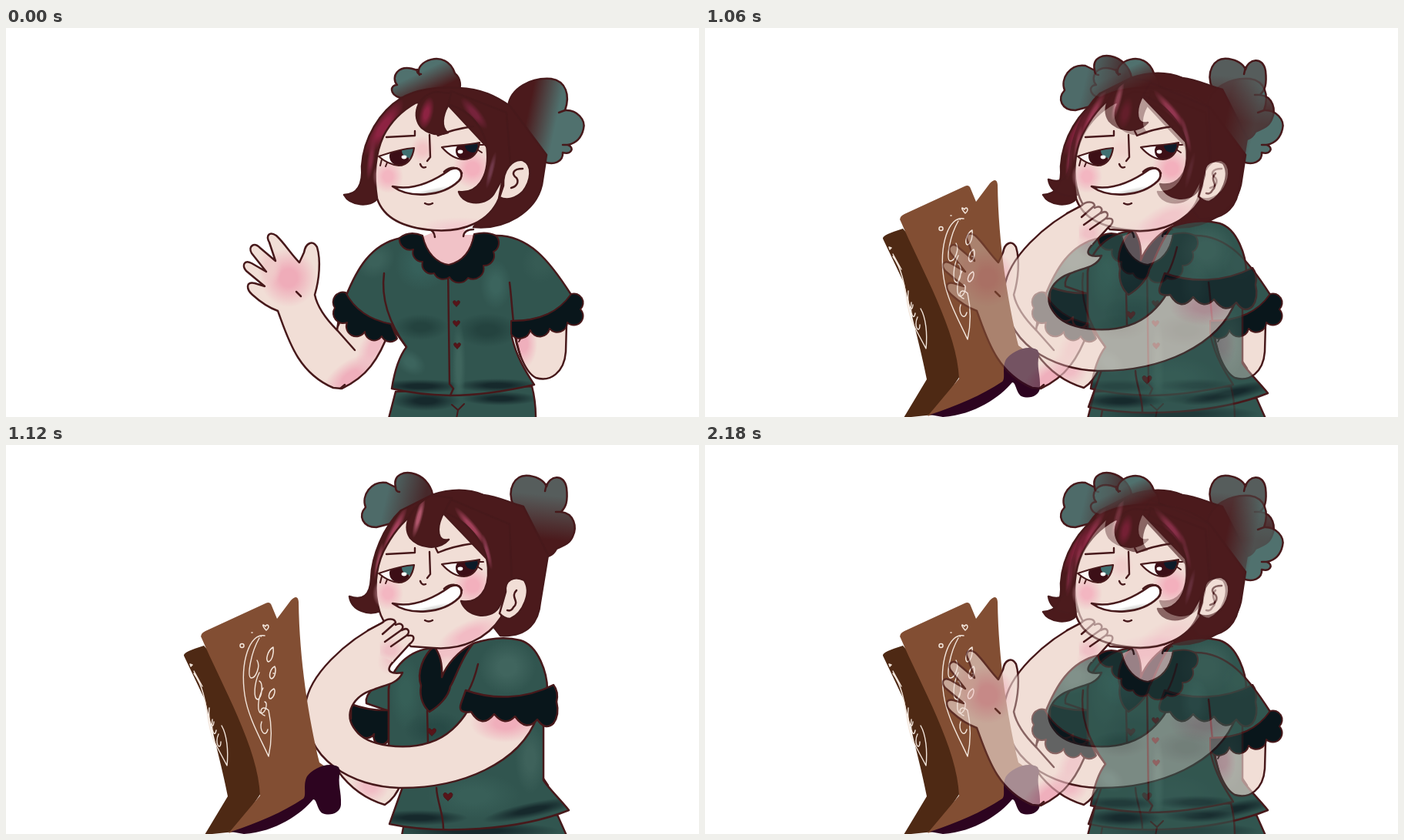
An HTML page with a canvas for the animation above (2240 ms loop, 900 by 506 pixels).

```html
<!DOCTYPE html>
<html lang="en">
<head>
<meta charset="utf-8">
<title>Wave and boots</title>
<style>
html, body { margin: 0; width: 100%; height: 100%; overflow: hidden; background: #fff; }
canvas { display: block; }
</style>
</head>
<body>
<canvas id="stage" width="900" height="506"></canvas>
<script>
const INK = '#47191b', HAIR = '#4b1a1c', CRIMSON = '#8d2342', TEAL = '#50716e';
const SKIN = '#f1ded6', PINK = '#efafbc', SHIRT = '#31554f', LIGHT = '#40655e';
const DEEP = '#16292c', LACE = '#09161b', BROWN = '#824e33', UMBER = '#4e2914', SOLE = '#2d0420';
const stage = document.getElementById('stage').getContext('2d');
let ctx;

function layer(paint) {
  const canvas = document.createElement('canvas');
  canvas.width = 900;
  canvas.height = 506;
  ctx = canvas.getContext('2d');
  ctx.lineCap = ctx.lineJoin = 'round';
  paint();
  return canvas;
}

function line(d, width = 2.5, color = INK) {
  ctx.lineWidth = width;
  ctx.strokeStyle = color;
  ctx.stroke(new Path2D(d));
}

function soft(x, y, rx, ry, color, angle = 0) {
  ctx.save();
  ctx.translate(x, y);
  ctx.rotate(angle * Math.PI / 180);
  ctx.scale(rx, ry);
  const glow = ctx.createRadialGradient(0, 0, 0, 0, 0, 1);
  glow.addColorStop(0.3, color);
  glow.addColorStop(1, color + '00');
  ctx.fillStyle = glow;
  ctx.fillRect(-1, -1, 2, 2);
  ctx.restore();
}

// Filled outline with soft shading kept inside it.
function shape(d, fill, shades = [], width = 2.5, color = INK) {
  const path = new Path2D(d);
  ctx.fillStyle = fill;
  ctx.fill(path);
  ctx.save();
  ctx.clip(path);
  shades.forEach(s => soft(...s));
  ctx.restore();
  if (width) line(d, width, color);
}

function blend(x0, y0, x1, y1, from, to) {
  const g = ctx.createLinearGradient(x0, y0, x1, y1);
  g.addColorStop(0, from);
  g.addColorStop(1, to);
  return g;
}

function heart(x, y, s) {
  shape(`M${x} ${y + s} C${x - 2 * s} ${y - s * .3} ${x - s * .8} ${y - s * 1.5} ${x} ${y - s * .4}
    C${x + s * .8} ${y - s * 1.5} ${x + 2 * s} ${y - s * .3} ${x} ${y + s}Z`, '#571419', [], 1);
}

function eye(d, irisX, irisY, tealX, glintX, glintY) {
  const path = new Path2D(d);
  const dot = (x, y, rx, ry, color) => {
    ctx.fillStyle = color;
    ctx.beginPath();
    ctx.ellipse(x, y, rx, ry, 0, 0, 7);
    ctx.fill();
  };
  ctx.fillStyle = '#fbf7f5';
  ctx.fill(path);
  ctx.save();
  ctx.clip(path);
  dot(irisX, irisY, 13, 12, '#3c0e16');
  dot(tealX, irisY - 7, 10, 9, tealX < 560 ? '#3f6f70' : '#0c1a28');
  dot(glintX, glintY, 3.4, 2.4, '#fff');
  ctx.restore();
  line(d, 2.2);
}

function features() {
  soft(496, 193, 20, 22, '#f3b6c1');
  soft(606, 183, 26, 26, '#f3b0bd');
  eye('M484 167 C496 163 515 157 530 156 C528 170 521 179 510 179 C499 178 491 173 484 167Z', 511, 167, 524, 517, 168);
  eye('M566 155 C580 153 600 152 615 149 C613 162 606 171 595 171 C583 171 574 164 566 155Z', 597, 160, 606, 590, 161);
  line('M488 171 L486 179 M495 175 L493 180 M613 152 L620 152 M612 158 L618 162', 2);
  line('M494 142 L531 140 L531 134 M558 134 L561 140 C575 134 592 130 607 128 M550 139 L551 168 L547 173 M538 177 Q540 183 545 181 M544 228 Q549 231 554 228', 2.4);
  shape('M502 206 C529 212 556 199 577 184 C590 178 596 191 588 199 C566 220 524 222 502 206Z', '#fff',
    [[548, 218, 46, 8, '#c9c9c6', -14]], 2.7);
  line('M569 187 C577 180 589 180 592 189', 2.7);
}

function waving() {
  // Buns and back hair
  shape('M512 91 C497 86 499 74 508 74 C499 64 509 45 534 55 L537 61 C528 44 572 25 583 59 C591 66 591 76 588 82Z',
    blend(537, 58, 550, 85, TEAL, HAIR));
  shape('M652 102 C655 78 682 64 708 66 C727 69 733 87 726 107 C742 106 753 120 750 131 C747 145 739 150 730 152 C739 156 734 165 723 162 C724 174 711 179 699 174Z',
    blend(676, 118, 714, 126, HAIR, TEAL));
  line('M534 54 Q533 60 539 60 M726 107 L718 110 M730 152 L723 152');
  shape('M607 259 C648 263 688 239 696 204 L702 165 L655 102 C637 89 617 79 588 78 C560 76 531 80 512 92 C486 108 464 143 462 180 C464 204 456 217 439 217 C447 232 474 233 482 222 L640 220Z',
    HAIR, [[490, 129, 13, 44, CRIMSON, 34], [474, 170, 5, 28, '#7b293e', 8]]);

  // Back arm, trousers and shirt
  shape('M659 388 C662 415 673 447 688 455 C707 461 725 448 727 421 L728 384Z', SKIN, [[672, 411, 18, 32, PINK]]);
  line('M661 403 L670 401 L666 408', 1.8);
  shape('M506 473 L497 508 H688 Q688 485 683 466Z', SHIRT, [[545, 485, 45, 13, DEEP], [642, 482, 50, 9, DEEP]]);
  line('M579 490 L587 497 L595 489 M587 497 L585 508', 2);

  // Raised arm
  shape('M440 352 L432 379 L430 393 C421 384 405 366 401 347 C407 327 409 302 404 285 C398 275 389 280 387 292 L381 305 C370 294 361 279 351 270 C342 264 337 270 342 279 L350 303 L330 286 C322 278 314 284 319 293 L338 317 L319 306 C309 301 306 309 312 316 L336 336 L323 332 C311 329 312 340 320 347 C331 357 342 364 353 368 C366 403 378 448 425 468 L436 469 C468 454 484 432 499 391Z',
    SKIN, [[367, 325, 37, 38, '#efacb9'], [342, 310, 16, 26, '#efcbc9'], [448, 455, 44, 22, PINK, -36], [478, 415, 18, 40, '#f0bdc5', 28]]);
  line('M430 393 L453 419 M377 343 L383 349 M431 388 L435 379 M434 469 L440 464');

  const shades = [
    [539, 389, 36, 17, '#24433f'], [625, 393, 42, 22, '#24433f'], [540, 307, 35, 35, '#36605a'],
    [636, 334, 20, 32, '#3b645d'], [525, 435, 22, 15, '#3c645d', 35], [538, 466, 58, 9, DEEP], [638, 465, 55, 9, DEEP], [588, 440, 9, 60, '#3f655d']];
  shape('M513 273 C473 281 455 315 441 350 C454 370 477 382 498 385 L520 415 C510 428 504 450 501 469 Q535 477 577 478 C613 478 651 472 686 464 C675 447 663 428 657 402 L657 381 C695 381 719 369 734 347 C706 303 679 269 635 270Z',
    SHIRT, [...shades, [480, 302, 27, 22, '#3b615a', -40], [695, 305, 25, 27, '#365b54', 35]]);
  line('M491 319 C487 350 496 382 520 415 M654 331 C658 361 657 391 668 427 M574 309 L576 463 L581 469 L577 478');
  shape('M441 344 C453 367 474 380 500 385 L508 404 A12 12 0 0 1 488 401 A12 12 0 0 1 466 395 A13 13 0 0 1 443 383 A13 13 0 0 1 427 364 A13 13 0 0 1 441 344Z', LACE, [], 2);
  shape('M656 381 C692 382 718 369 734 346 A12 12 0 0 1 746 366 A12 12 0 0 1 729 383 A13 13 0 0 1 706 391 A13 13 0 0 1 681 393 A14 14 0 0 1 656 398Z', LACE, [], 2);
  heart(585, 358, 4);
  heart(585, 384, 4);
  heart(586, 413, 4);

  // Neck and collar
  shape('M552 250 L554 266 L540 272 C546 296 560 307 575 308 C593 305 603 291 607 269 L595 269 L597 250Z', '#f1c2c7', [], 0);
  line('M549 262 Q556 263 557 272 M607 262 Q595 262 594 271');
  shape('M511 273 Q524 263 541 270 C546 293 560 306 575 308 C592 304 604 291 608 268 Q625 264 636 270 A13 13 0 0 1 633 291 A13 13 0 0 1 620 309 A14 14 0 0 1 600 325 A14 14 0 0 1 576 324 A13 13 0 0 1 556 319 A12 12 0 0 1 541 304 A12 12 0 0 1 529 288 A14 14 0 0 1 511 273Z', LACE, [], 2);

  // Head
  shape('M482 222 C477 190 480 163 490 141 C500 121 515 107 533 97 L572 98 L648 180 L640 222 C628 251 596 266 555 263 C514 260 490 246 482 222Z', SKIN,
    [[590, 260, 55, 14, '#f2cdd0'], [541, 158, 16, 18, '#f2c4c5']]);
  features();
  shape('M568 98 C604 104 624 134 625 162 C627 194 612 216 588 213 C594 232 626 232 635 213 L655 178 L650 110 L578 82Z', HAIR,
    [[608, 111, 26, 8, '#76233b', 50], [630, 185, 4, 25, '#71394a', 14]]);
  shape('M646 205 C645 184 658 170 671 172 C685 178 682 199 671 213 C662 222 650 225 641 220Z', SKIN);
  line('M671 183 C658 183 656 190 663 195 C667 201 662 207 656 208');
  shape('M558 83 C533 88 526 116 540 130 C551 139 563 140 574 136 C564 130 567 113 574 101 L578 85Z', HAIR,
    [[546, 111, 9, 22, CRIMSON, 14]]);
}

function ornaments() {
  const white = '#f3e6dc';
  line('M336 248 C316 244 304 283 310 325 C314 353 330 381 341 405 C347 378 343 354 341 345 C331 336 327 350 336 352 M329 251 C318 270 313 300 318 303 C324 304 331 288 326 280 M329 296 C322 310 321 331 327 331 C333 328 334 309 329 307 M334 316 C326 331 326 349 332 349 C338 347 340 335 336 334 M332 360 C328 371 337 382 340 370',
    1.4, white);
  line('M347 263 C340 267 336 281 341 282 C346 280 348 270 347 263 M349 288 C343 291 340 303 345 304 C350 302 351 292 349 288 M348 317 C340 321 340 331 344 330 C349 327 350 319 348 317 M309 261 a2.5 2.5 0 1 0 -5 0 a2.5 2.5 0 1 0 5 0 M319 244 h1 M331 249 h.5 M347 297 h1 M338 241 C332 234 333 232 337 236 C339 231 344 236 338 241',
    1.5, white);
  line('M240 288 l-1 -3 l3 1 Z M244 297 C264 326 258 357 270 385 L287 417 C289 398 287 377 280 365 M264 342 C262 360 269 373 270 360 M268 357 C266 371 271 382 273 371 M276 376 C270 389 279 399 279 386 M244 294 L255 314',
    1.4, white);
}

function boots() {
  shape('M231 274 Q230 269 257 261 L318 330 L340 440 L329 456 L297 503 L258 507 L288 457 C281 420 266 365 259 333Z', UMBER, [], 0);
  shape('M254 251 Q251 246 259 242 L337 206 Q343 203 345 209 L352 226 L370 202 Q379 193 380 204 C381 280 393 355 407 413 L418 421 L389 462 L336 490 L289 505 L330 456 C328 395 281 314 254 251Z', BROWN, [], 0);
  shape('M432 419 C419 411 398 421 391 431 C385 442 391 456 386 460 C361 477 326 492 292 503 L309 506 C351 503 383 480 399 461 C404 461 404 475 411 479 C421 483 434 479 435 468 C436 451 430 441 434 424Z', SOLE, [], 0);
  ornaments();
}

function thinking() {
  // Buns and back hair
  shape('M481 107 C463 107 457 92 467 81 C461 66 474 46 494 49 L506 55 C502 38 518 33 532 38 C546 43 554 57 554 67 L516 98Z',
    blend(492, 74, 540, 86, '#4e6b69', '#47282a'));
  shape('M659 79 C650 58 660 37 680 40 C692 42 699 47 702 54 C705 40 725 36 728 56 C730 74 727 81 721 87 C738 89 742 107 736 119 C731 131 719 132 715 135 C710 145 701 147 695 144Z',
    blend(700, 65, 694, 122, '#565d5c', HAIR));
  line('M506 55 Q506 61 511 61 M702 51 L700 60 M721 87 L714 87');
  shape('M642 248 C679 250 692 229 694 204 L704 143 L672 80 C653 75 639 67 620 65 C603 58 580 56 553 65 L513 85 C490 107 475 144 474 174 C473 196 463 203 446 197 C449 216 471 222 486 216 L618 217Z',
    HAIR, [[504, 112, 6, 37, '#a2405a', 27], [484, 151, 4, 25, '#9a4659', 12]]);

  // Far sleeve, trousers and shirt
  shape('M518 487 L514 508 H728 L716 481Z', SHIRT, [[610, 502, 110, 12, DEEP]]);
  shape('M431 424 Q455 457 492 468 Q506 459 513 440 L453 414Z', SKIN, [[473, 444, 25, 22, '#f0bdc5']]);
  shape('M508 298 C485 309 465 321 468 336 L497 346 V315Z', SHIRT);
  shape('M448 337 Q472 346 497 345 V383 A10 10 0 0 1 478 376 A12 12 0 0 1 459 377 A12 12 0 0 1 448 356Z', LACE);
  shape('M555 264 C523 266 500 290 497 318 V390 L515 445 L498 493 C565 507 667 501 731 475 C718 459 705 447 698 436 L698 361 L703 318 C703 298 692 261 668 254 C645 248 622 253 607 258Z', SHIRT,
    [[651, 289, 37, 35, LIGHT], [519, 322, 21, 48, '#365f57'], [557, 370, 40, 24, '#284a46'], [681, 408, 20, 45, '#3e625b'], [607, 456, 60, 30, '#385f58'], [535, 485, 65, 10, DEEP], [682, 475, 64, 10, DEEP, -12]]);
  line('M547 346 L548 387 M559 446 C560 465 568 479 568 499 M613 285 C609 302 605 312 600 321 M698 434 L704 443');

  // Crossed arm and hand
  shape('M690 353 C668 414 591 447 510 446 C452 444 386 412 389 338 C393 300 440 255 489 231 C496 224 503 225 505 232 C513 230 517 237 514 240 C522 238 526 245 521 248 C530 246 531 255 524 259 L504 281 C489 296 503 298 515 296 C509 312 487 313 478 318 C451 326 437 350 454 371 C470 393 519 397 550 387 C573 380 590 362 600 345Z',
    SKIN, [[507, 270, 20, 32, '#efc1c6', 35], [649, 362, 46, 25, '#f0aebb']]);

  // Neck and collar
  shape('M555 254 L566 302 L607 258 L615 242Z', '#f1c2c7', [[574, 291, 16, 18, SKIN]], 0);
  shape('M556 262 C542 273 533 296 539 313 C536 330 544 342 550 347 C562 340 575 327 577 314 C584 303 591 277 607 258 C587 268 572 286 566 302 C567 285 564 272 556 262Z', LACE);
  shape('M597 319 C630 331 672 332 711 312 Q718 321 715 334 Q719 351 711 362 Q700 372 690 357 Q676 374 661 353 Q648 367 634 350 Q618 370 604 347 Q586 350 591 336Z', LACE);
  heart(553, 373, 5);
  heart(574, 457, 5.5);

  // Head
  shape('M485 216 C477 190 480 161 490 139 C501 117 513 101 530 89 L566 87 L650 175 L643 224 C625 252 592 267 555 264 L526 262 C502 246 489 232 485 216Z', SKIN,
    [[602, 247, 46, 18, '#f2bbc4', -25]]);
  features();
  shape('M563 86 C598 95 624 128 626 160 C628 189 614 207 591 203 C597 223 628 229 640 211 L657 180 L654 103 L576 70Z', HAIR,
    [[604, 106, 33, 6, '#a2405a', 50], [625, 139, 4, 24, '#8a3a50', -14]]);
  shape('M649 191 C647 176 660 169 673 176 C683 191 672 218 655 226 Q647 226 641 219Z', SKIN);
  line('M663 189 C654 198 668 203 659 211 C657 215 654 216 651 215');
  shape('M553 65 C528 78 513 103 525 121 C536 134 562 138 575 123 C560 127 559 109 566 93 L579 69Z', HAIR,
    [[536, 94, 5, 28, '#b0566c', 15]]);

  // Fingers rest over the chin
  shape('M485 247 L489 231 C496 224 504 224 506 231 C513 229 518 236 514 240 C521 236 526 243 522 247 C531 246 531 254 525 258 L503 282 L486 274Z', SKIN,
    [[499, 267, 20, 16, '#efc1c6']], 0);
  line('M470 241 L489 231 C496 224 505 226 506 231 L489 246 M506 234 C514 230 518 236 513 241 L492 256 M514 241 C522 236 526 243 520 248 L500 262 M522 248 C532 246 531 254 524 259 L504 281');
  boots();
}

const wave = layer(waving), think = layer(thinking);

// Dissolve `over` into the silhouette of `base`, optionally showing the rest of it behind.
function dissolve(base, over, amount, union) {
  stage.clearRect(0, 0, 900, 506);
  stage.drawImage(base, 0, 0);
  stage.globalCompositeOperation = 'source-atop';
  stage.globalAlpha = amount;
  stage.drawImage(over, 0, 0);
  stage.globalAlpha = 1;
  stage.globalCompositeOperation = 'destination-over';
  if (union) stage.drawImage(over, 0, 0);
  stage.globalCompositeOperation = 'source-over';
}

function frame() {
  const t = performance.now() % 2240;
  if (t < 1000) dissolve(wave, think, 0, false);
  else if (t < 1060) dissolve(wave, think, .38, false);
  else if (t < 1120) dissolve(think, wave, .36, true);
  else if (t < 2120) dissolve(think, wave, 0, false);
  else if (t < 2180) dissolve(think, wave, .36, false);
  else dissolve(wave, think, .38, true);
  requestAnimationFrame(frame);
}
frame();
</script>
</body>
</html>
```
